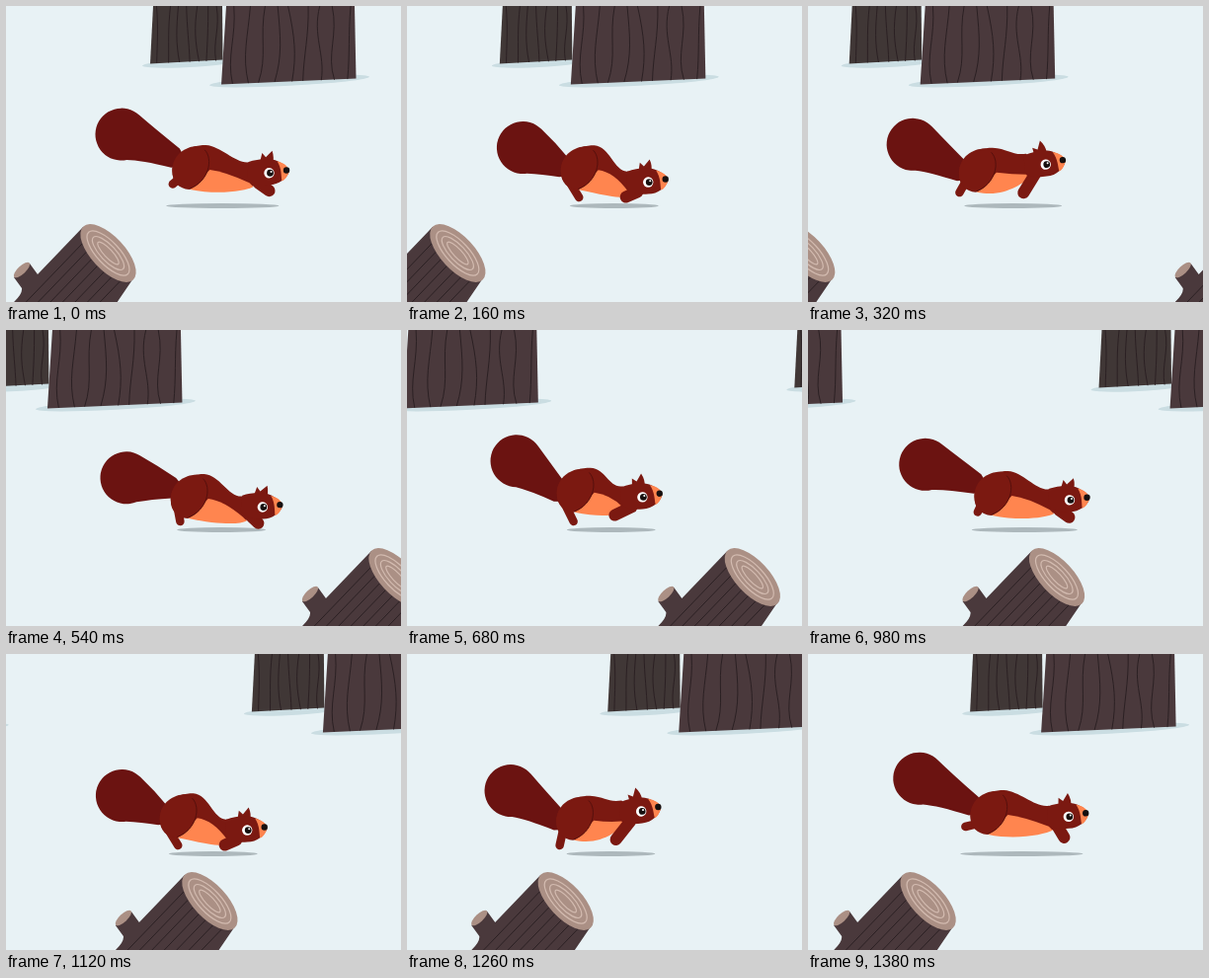
Animation of 400x300 px, one loop 1400 ms. Source, as an HTML page:

```html
<!DOCTYPE html>
<html lang="en">
<head>
<meta charset="utf-8">
<title>Running squirrel</title>
<style>
html, body { margin: 0; width: 100%; height: 100%; overflow: hidden; background: #e8f2f5; }
svg { display: block; width: 400px; height: 300px; }
.ground { fill: #cadde2; }
.bark { fill: #4a393c; }
.far { fill: #403736; }
.grain { fill: none; stroke: #2b2023; stroke-width: 1; }
.wood { fill: #ab9085; }
.rings { fill: none; stroke: #d3bbb0; stroke-width: 1.2; }
.fur { fill: #7b1911; }
.limb { fill: none; stroke: #7b1911; stroke-linecap: round; }
.dark { fill: #6b1311; }
.crease { fill: none; stroke: #56100d; stroke-linecap: round; }
.belly { fill: #ff854f; }
</style>
</head>
<body>
<svg viewBox="0 0 400 300">
  <defs>
    <g id="tile">
      <ellipse class="ground" cx="186" cy="58" rx="48" ry="4" transform="rotate(-3 186 58)"/>
      <path class="far" d="M149 0H219L219.500 54.500L146 58.500Z"/>
      <path id="farGrain" class="grain"/>
      <ellipse class="ground" cx="287" cy="76" rx="81" ry="4.800" transform="rotate(-3 287 76)"/>
      <path class="bark" d="M223 0H353L354.500 73.500L218 79.500Z"/>
      <path id="nearGrain" class="grain"/>
      <path class="bark" d="M78 224L32 272L24 261L8 275L16 286Q17 292 7 301H112L129 276Z"/>
      <path id="logGrain" class="grain"/>
      <ellipse class="wood" rx="10.500" ry="4" transform="translate(16 267.500) rotate(-43)"/>
      <g transform="translate(103.500 250.500) rotate(47)">
        <ellipse class="wood" rx="37" ry="17"/>
        <g id="rings" class="rings"></g>
      </g>
    </g>
  </defs>
  <g id="scene">
    <use href="#tile"/>
    <use href="#tile" x="468"/>
  </g>
  <ellipse id="shade" fill="#adb8bc" cy="202.500" ry="2.500"/>
  <path id="tail" class="dark"/>
  <path id="foot" class="limb" stroke-width="8.500"/>
  <path id="body" class="fur"/>
  <path id="belly" class="belly"/>
  <path id="thigh" class="fur"/>
  <path id="crease" class="crease"/>
  <path id="arm" class="limb" stroke-width="12"/>
  <g id="head">
    <path id="ear" class="fur" d="M-10 -9L-8 -20L-4 -16L2 -23Q5 -16 3 -9Z"/>
    <path class="fur" d="M-21 -11C-12 -14 0 -16 9 -12C14 -9 20 -7 20 -1C18 5 10 12 0 12C-10 13 -20 11 -22 4Z"/>
    <path class="belly" d="M8 -12C15 -10 20 -7 20 -1C18 4 16 7 13 8C12 3 13 -4 8 -12Z"/>
    <circle cx="17.500" cy="-3" r="3.200" fill="#17100f"/>
    <circle r="5.200" fill="#fff"/>
    <circle cx="1" r="3.400" fill="#17100f"/>
    <circle cx="2" cy="-1.300" r="1" fill="#fff"/>
  </g>
</svg>
<script>
const LOOP = 1400, STRIDE = 480, SPEED = 0.326, RAD = Math.PI / 180;

const $ = id => document.getElementById(id);
const draw = (id, d) => $(id).setAttribute("d", d);

let seed = 11;
const random = () => (seed = seed * 16807 % 2147483647) / 2147483647;

// Wavy lines down a trunk
function trunkGrain(left, right, count, bottom) {
  const gap = (right - left) / count, sway = () => (random() - 0.5) * gap;
  let d = "";
  for (let i = 0; i < count; i++) {
    const x = left + gap * (i + 0.5), end = bottom - (x - left) * 0.04;
    d += `M${x + sway() / 2} 0C${x + sway()} ${end * 0.4} ${x + sway()} ${end * 0.65} ${x + sway() / 2} ${end}`;
  }
  return d;
}

// Straight lines running back from the cut face
function logGrain() {
  const cos = Math.cos(47 * RAD), sin = Math.sin(47 * RAD);
  let d = "";
  for (let u = -25; u < 36; u += 9) {
    const rim = 17 * Math.sqrt(1 - (u / 37) ** 2);
    d += `M${103.5 + u * cos - rim * sin} ${250.5 + u * sin + rim * cos}l-75 78`;
  }
  return d;
}

draw("farGrain", trunkGrain(150, 219, 7, 58));
draw("nearGrain", trunkGrain(223, 353, 9, 79));
draw("logGrain", logGrain());
for (let i = 1; i < 4; i++) {
  const ring = document.createElementNS("http://www.w3.org/2000/svg", "ellipse");
  ring.setAttribute("rx", 36 - 7 * i);
  ring.setAttribute("ry", 15 - 3.6 * i);
  $("rings").append(ring);
}

function tailPath(tx, ty, bx, by) {
  const r = 26.5, a = Math.atan2(by - ty, bx - tx), side = Math.PI / 2;
  const at = (x, y, turn, len) =>
    `${x + Math.cos(a + turn) * len} ${y + Math.sin(a + turn) * len} `;
  return `M${at(tx, ty, -1.25, r)}Q${at(tx, ty, -0.6, 34)}${at(bx, by, -side, 11)}` +
    `L${at(bx, by, 0, 14)}L${at(bx, by, side, 10)}` +
    `Q${at(tx, ty, 0.5, 33)}${at(tx, ty, 0.95, r)}A${r} ${r} 0 1 1 ${at(tx, ty, -1.25, r)}Z`;
}

function squirrel(t) {
  const angle = t / STRIDE * 360;
  // Swing once per stride, with an optional double-time bounce
  const wave = (mid, amp, peak, amp2 = 0, peak2 = 0) =>
    mid + amp * Math.cos((angle - peak) * RAD) + amp2 * Math.cos((2 * angle - peak2) * RAD);

  const hx = wave(179, 9.5, 10), hy = wave(164, 1.5, 90, 3, 110);
  const ex = wave(250.5, 16, 0, 2, -90), ey = wave(169.5, 11, 70, 4, 180);
  const tx = wave(113.5, 8.5, 50, 2, 180), ty = wave(138, 8, 90, 10, 142);
  const bx = hx - 17, by = hy + wave(-1.5, 7, 190);
  const fx = hx + wave(-13.5, 12, 120), fy = Math.min(194, wave(194, 19, 135));
  const px = ex + wave(-15, 15, 0), py = wave(190, 4.5, 75, 4.4, 155);
  const ear = wave(-8, 18, 50);

  const hip = (x, y) => `${hx + x} ${hy + y} `;
  const eye = (x, y) => `${ex + x} ${ey + y} `;

  $("shade").setAttribute("cx", hx * 0.75 + 78);
  $("shade").setAttribute("rx", 45 + 0.9 * (194 - fy));
  draw("tail", tailPath(tx, ty, bx, by));
  draw("foot", `M${hip(-13, 12)}L${fx} ${fy}`);
  draw("body", `M${hip(-20, 4)}C${hip(-20, -12)}${hip(-4, -22)}${hip(14, -22)}` +
    `C${hip(30, -21)}${eye(-34, -9)}${eye(-20, -11)}L${eye(-4, 0)}L${eye(-12, 12)}` +
    `C${eye(-22, 16)}${hip(28, 25)}${hip(4, 23)}C${hip(-12, 22)}${hip(-20, 16)}${hip(-20, 4)}Z`);
  draw("belly", `M${hip(-2, 23)}L${hip(18, 3)}Q${hip(34, 5)}${eye(-20, 10)}` +
    `L${eye(-16, 14)}C${eye(-24, 18)}${hip(27, 29)}${hip(-2, 23)}Z`);
  draw("thigh", `M${hip(-20, 4)}C${hip(-20, -14)}${hip(-4, -22)}${hip(8, -21)}` +
    `C${hip(24, -16)}${hip(20, 14)}${hip(-3, 23)}C${hip(-13, 22)}${hip(-20, 16)}${hip(-20, 4)}Z`);
  draw("crease", `M${hip(13, -17)}C${hip(22, -8)}${hip(17, 15)}${hip(-2, 22)}`);
  draw("arm", `M${eye(-11, 10)}L${px} ${py}`);
  $("head").setAttribute("transform", `translate(${ex} ${ey}) rotate(${ear * 0.2})`);
  $("ear").setAttribute("transform", `rotate(${ear * 0.8} -5 -8)`);
}

const start = performance.now();
function frame() {
  const t = Math.floor((performance.now() - start) % LOOP / 20) * 20;
  $("scene").setAttribute("transform", `translate(${-SPEED * t} 0)`);
  squirrel(t % STRIDE);
  requestAnimationFrame(frame);
}
frame();
</script>
</body>
</html>
```
